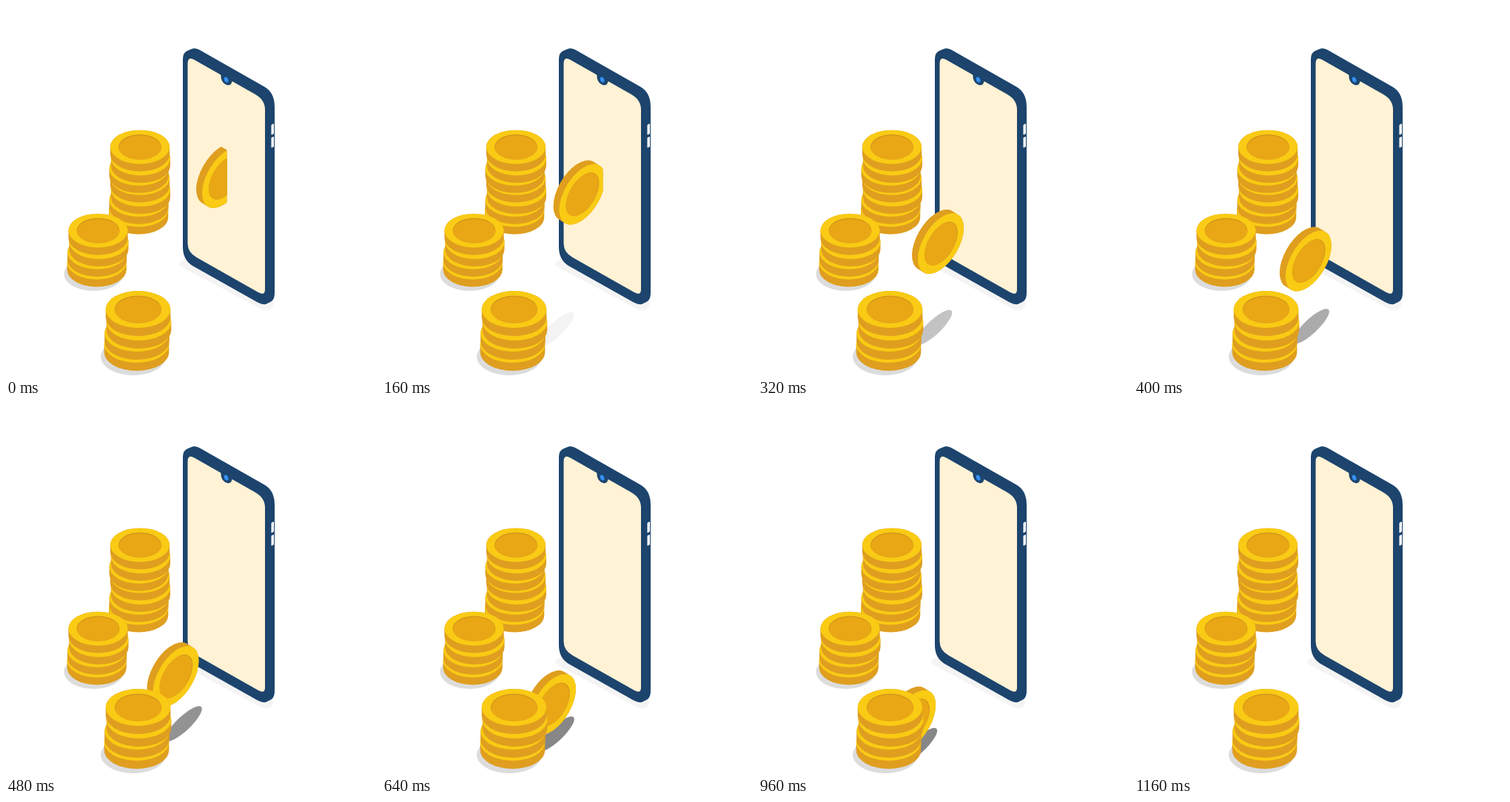
These frames come from a looping animation (500 by 500 pixels, 2200 ms). An HTML page with a canvas:

```html
<!DOCTYPE html>
<html lang="en">
<head>
<meta charset="utf-8">
<title>Coins from a phone</title>
<style>
  html, body { margin: 0; width: 100%; height: 100%; overflow: hidden; background: #fff; }
  canvas { display: block; width: 100vmin; height: 100vmin; }
</style>
</head>
<body>
<canvas id="stage"></canvas>
<script>
const SIZE = 500, LOOP = 2200, STEP = 40, GONE = 1160;
const RIM = '#f9cb14', EDGE = '#df9e1f', FACE = '#e9a716', DENT = '#d6961b';
const NAVY = '#1c446d', CREAM = '#fff2d5';

const canvas = document.getElementById('stage');
const ctx = canvas.getContext('2d');
let scale = 1;

function resize() {
  scale = Math.min(innerWidth, innerHeight) / SIZE * (devicePixelRatio || 1);
  canvas.width = canvas.height = Math.round(SIZE * scale);
}

// Keys: [time, x, y]
const coinPath = [
  [0, 296, 232], [160, 270.5, 254.5], [320, 247, 321], [480, 229.5, 368],
  [560, 233.5, 401], [640, 231, 406], [800, 222, 416], [1120, 195, 440]
];
const shadowPath = [
  [160, 258, 415], [320, 261, 412], [480, 263.5, 409.5], [560, 262.5, 414],
  [640, 258.5, 423.5], [800, 253, 430.5], [1120, 226, 448]
];

// Monotone cubic interpolation through the keys
function follow(keys, t) {
  const last = keys.length - 1;
  t = Math.max(keys[0][0], Math.min(keys[last][0], t));
  let i = 0;
  while (i < last - 1 && t > keys[i + 1][0]) i++;
  const span = keys[i + 1][0] - keys[i][0];
  const u = (t - keys[i][0]) / span;
  return [1, 2].map(axis => {
    const slope = k => (keys[k + 1][axis] - keys[k][axis]) / (keys[k + 1][0] - keys[k][0]);
    const tangent = k => {
      if (k === 0) return slope(0);
      if (k === last) return slope(last - 1);
      const a = slope(k - 1), b = slope(k);
      return a * b > 0 ? 2 * a * b / (a + b) : 0;
    };
    const a = keys[i][axis], b = keys[i + 1][axis];
    const v = 1 - u;
    return a * v * v * (1 + 2 * u) + b * u * u * (3 - 2 * u)
      + span * u * v * (v * tangent(i) - u * tangent(i + 1));
  });
}

function fillPath(d, color) {
  ctx.fillStyle = color;
  ctx.fill(new Path2D(d));
}

function ellipse(x, y, rx, ry, color, turn = 0) {
  ctx.fillStyle = color;
  ctx.beginPath();
  ctx.ellipse(x, y, rx, ry, turn, 0, Math.PI * 2);
  ctx.fill();
}

function phone() {
  fillPath('M234 350 Q234 345 241 343 L362 402 Q362 408 354 411 Q350 412 344 409 L238 353 Z', '#f4f4f4');
  fillPath('M239 72 Q239 63 245 60.5 L251 58 Q255 56 261 59 L349 109 Q363 117 363 136 ' +
    'L363 388 Q363 397 358 399.5 L352 402.5 Q348 404.5 340 400.5 L252 351 Q239 343 239 326 Z', NAVY);
  fillPath('M245.5 78 Q245.5 67 255 73 L337 119.5 Q350 127 350 140 L350 383 ' +
    'Q350 392 341 387 L258 340 Q245.5 333 245.5 321 Z', CREAM);
  fillPath('M288 89 L290 92.5 C291 93 290 97 291.5 100 C293 104 297 107 300.5 107 ' +
    'C304 107 305 104 305.5 101.5 L307 101 Z', NAVY);
  ellipse(297.6, 99.6, 2.7, 3.9, '#3390ee', -0.45);
  for (const y of [159, 176.5]) {
    fillPath(`M358.5 ${y + 2} Q358.5 ${y + 1} 362 ${y} L362 ${y + 13} Q361 ${y + 15} 358.5 ${y + 15} Z`, '#fff');
  }
}

function flatCoin(x, y, s) {
  const rx = 43.8 * s, ry = 25 * s, h = 11 * s;
  ctx.fillStyle = EDGE;
  ctx.beginPath();
  ctx.ellipse(x, y + h, rx, ry, 0, 0, Math.PI);
  ctx.ellipse(x, y, rx, ry, 0, Math.PI, Math.PI * 2);
  ctx.fill();
  ellipse(x, y, rx, ry, RIM);
}

const stackX = [0, 1, -1.5, -2], stackY = [0, 17, 32, 47];

function stack(x, y, s, count) {
  for (let i = count - 1; i >= 0; i--) flatCoin(x + stackX[i] * s, y + stackY[i] * s, s);
}

function stackTop(x, y, s) {
  ellipse(x, y, 31.7 * s, 18.6 * s, DENT);
  ellipse(x + 0.3, y + 0.8, 31.2 * s, 17.8 * s, FACE);
}

function pile(x, y, s) {
  ellipse(x - 6.5 * s, y + 64 * s, 44 * s, 25 * s, '#dcdcdc');
  stack(x, y, s, 4);
  stackTop(x, y, s);
}

function tallPile(x, y, s) {
  stack(x, y + 46 * s, s, 4);
  stack(x, y, s, 3);
  stackTop(x, y, s);
}

// Adds an upright, sheared disc to the current path
function disc(x, y, k) {
  ctx.save();
  ctx.transform(31 * k, -21 * k, 0, 35.2 * k, x, y);
  ctx.moveTo(1, 0);
  ctx.arc(0, 0, 1, 0, Math.PI * 2);
  ctx.restore();
}

function fillDisc(x, y, k, color) {
  ctx.fillStyle = color;
  ctx.beginPath();
  disc(x, y, k);
  ctx.fill();
}

function flyingCoin(t) {
  const [x, y] = follow(coinPath, t);
  ctx.save();
  // Slot in the screen that the coin comes out of
  ctx.beginPath();
  ctx.moveTo(0, 25);
  ctx.lineTo(298.5, 194.5);
  ctx.lineTo(298.5, 300);
  ctx.lineTo(SIZE, 300);
  ctx.lineTo(SIZE, SIZE);
  ctx.lineTo(0, SIZE);
  if (t < 240) ctx.clip();

  ctx.fillStyle = EDGE;
  ctx.beginPath();
  for (let i = 0; i <= 16; i++) disc(x - i / 2, y - i * 5 / 16, 1);
  ctx.fill();
  fillDisc(x, y, 1, RIM);
  fillDisc(x + 0.5, y, 0.72, DENT);
  fillDisc(x - 0.2, y + 0.5, 0.71, FACE);
  ctx.restore();
}

function coinShadow(t) {
  const alpha = Math.max(0, Math.min(0.47, (t - 120) * 0.00118));
  const [x, y] = follow(shadowPath, t);
  ellipse(x - 23.5, y + 22.5, 33, 9.5, `rgba(0,0,0,${alpha})`, -0.76);
}

function draw(t) {
  ctx.setTransform(scale, 0, 0, scale, 0, 0);
  ctx.fillStyle = '#fff';
  ctx.fillRect(0, 0, SIZE, SIZE);
  phone();
  tallPile(181, 190.5, 0.915);
  pile(124.5, 303.5, 0.915);
  const moving = t < GONE;
  if (moving) coinShadow(t);
  // The coin passes behind the front pile
  if (moving) flyingCoin(t);
  pile(178.5, 410, 1);
}

const start = performance.now();

function tick() {
  const t = (performance.now() - start) % LOOP;
  draw(Math.floor(t / STEP) * STEP);
  requestAnimationFrame(tick);
}

addEventListener('resize', resize);
resize();
tick();
</script>
</body>
</html>
```
